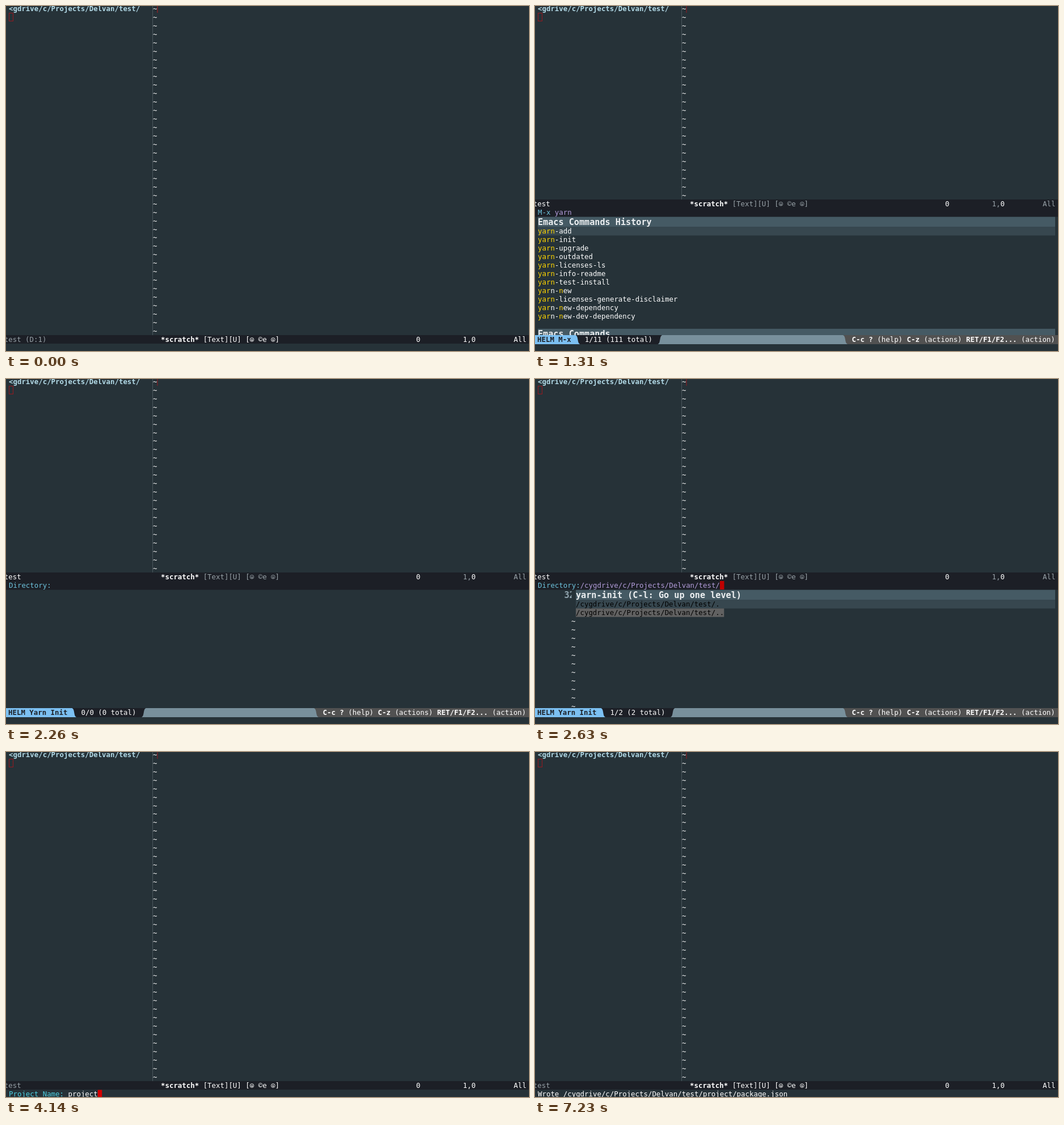
Animation, 922 px wide and 608 px high, one loop 8 s. Source, as an HTML page with a canvas:

```html
<!DOCTYPE html>
<html>
<head>
<meta charset="utf-8">
<style>
html, body { margin: 0; width: 100%; height: 100%; overflow: hidden; background: #263238; }
canvas { display: block; }
</style>
</head>
<body>
<canvas id="stage" width="922" height="608"></canvas>
<script>
const ctx = document.getElementById('stage').getContext('2d');
const LOOP = 8000, W = 922, H = 608;
const SIZE = 12.4, CHAR = SIZE * 0.60205, ROW = 14.95, BIG = 15.17, BIG_ROW = 17.8;
const BG = '#263238', DARK = '#1c1f26', WHITE = '#fff', GREY = '#98a2a8', YELLOW = '#ffd600';
const BAR = '#455a64', SELECTED = '#37474f', RED = '#d50000', DIM_RED = '#98191f';
const PATH = '/cygdrive/c/Projects/Delvan/test/';

const HISTORY = [
  'yarn-add', 'yarn-init', 'yarn-upgrade', 'yarn-outdated', 'yarn-licenses-ls',
  'yarn-info-readme', 'yarn-test-install', 'yarn-new',
  'yarn-licenses-generate-disclaimer', 'yarn-new-dependency', 'yarn-new-dev-dependency',
  'describe-key', 'neotree-dir', 'describe-variable', 'eval-buffer'
];
const COMMANDS = ['yarn-init', 'yarn-check-integrity', 'yarn-install', 'yarn-info'];

const rowTop = row => -2.9 + row * ROW;

function rect(x, y, w, h, color) {
  ctx.fillStyle = color;
  ctx.fillRect(x, y, w, h);
}

function text(x, top, str, color = WHITE, bold = false, size = SIZE) {
  ctx.font = `${bold ? 'bold ' : ''}${size}px "DejaVu Sans Mono", monospace`;
  ctx.fillStyle = color;
  ctx.fillText(str, x, Math.round(top + size * 0.945));
  return x + str.length * size * 0.60205;
}

// Each run is [string, color, bold].
const runs = (x, top, list) => list.reduce((at, run) => text(at, top, ...run), x);

function tildes(x, top, bottom) {
  for (let y = top; y < bottom; y += ROW) text(x, y, '~');
}

function clipped(x, y, w, h, draw) {
  ctx.save();
  ctx.beginPath();
  ctx.rect(x, y, w, h);
  ctx.clip();
  draw();
  ctx.restore();
}

function circled(x, top, letter, color) {
  ctx.strokeStyle = color;
  ctx.lineWidth = 0.9;
  ctx.beginPath();
  ctx.arc(x + CHAR / 2, top + 7.8, 3.3, 0, 7);
  ctx.stroke();
  ctx.font = 'bold 6px "DejaVu Sans Mono", monospace';
  ctx.fillStyle = color;
  ctx.fillText(letter, x + 2, top + 9.8);
}

function editor(bottomRow, helm, treeLabel, focused) {
  const top = rowTop(bottomRow);
  rect(0, 0, W, H, BG);
  text(5, rowTop(0), '<gdrive/c/Projects/Delvan/test/', '#b3dbe8', true);
  ctx.strokeStyle = DIM_RED;
  ctx.lineWidth = 1;
  ctx.strokeRect(5.5, 12.5, 7, 14);
  rect(258, 0, 1, top, '#4b565c');
  clipped(0, 0, W, top, () => tildes(259, rowTop(0), top));
  rect(266.5, 0, 1, 12, focused ? '#b51a1d' : DIM_RED);

  rect(0, Math.round(top), W, 15, DARK);
  const color = helm ? GREY : WHITE;
  text(-3.2, top, treeLabel, helm ? WHITE : GREY);
  runs(273, top, [['*scratch*', WHITE, true], [' [Text][U] [', color], ['  ©e  ]', color]]);
  circled(273 + 21 * CHAR, top, 'u', color);
  circled(273 + 26 * CHAR, top, 's', color);
  text(723, top, '0');
  runs(805.5, top, [['1,', color], ['0', WHITE]]);
  text(895, top, 'All', color);
}

// A band of the helm status line; its sides curve by the given widths.
function band(left, right, leftSlant, rightSlant, color) {
  const top = 580, bottom = 596;
  ctx.fillStyle = color;
  ctx.beginPath();
  ctx.moveTo(left, top);
  ctx.lineTo(right, top);
  ctx.bezierCurveTo(right + rightSlant * .7, top + 2, right + rightSlant * .3, bottom - 2, right + rightSlant, bottom);
  ctx.lineTo(left + leftSlant, bottom);
  ctx.bezierCurveTo(left + leftSlant * .3, bottom - 2, left + leftSlant * .7, top + 2, left, top);
  ctx.fill();
}

function helmStatus(name, count) {
  const top = rowTop(39), nameEnd = 4 + name.length * CHAR, countX = nameEnd + 24;
  const countEnd = countX + count.length * CHAR;
  rect(0, 580, W, 16, DARK);
  rect(500, 580, W - 500, 16, '#515151');
  band(countEnd + 17, 543, -7.5, 8, '#78909c');
  band(0, nameEnd + 8, 0, 7.5, '#7cc0f2');
  text(4, top, name, DARK, true);
  text(countX, top, count);
  runs(558.5, top, [
    ['C-c ?', WHITE, true], [' (help) '], ['C-z', WHITE, true], [' (actions) '],
    ['RET/F1/F2...', WHITE, true], [' (action)']
  ]);
}

function helmPrompt(label, input, cursor) {
  const top = rowTop(24);
  rect(0, Math.round(top), W, 15.5, DARK);
  const end = runs(5, top, [[label, '#6dc3dd'], [input, '#b39ddb']]);
  if (cursor) rect(end, top, CHAR, 15, '#c00000');
}

function header(x, top, title) {
  rect(x, top, 917 - x, BIG_ROW, BAR);
  text(x, top, title, '#eceff1', true, BIG);
}

// Fuzzy match preferring word starts and the last dash; returns matched indexes or null.
function match(name, pattern, from = 0) {
  if (!pattern) return [];
  const c = pattern[0];
  const wordStart = name.indexOf('-' + c, from);
  const options = [
    wordStart < 0 ? -1 : wordStart + 1,
    c === '-' ? name.lastIndexOf(c) : -1,
    name.indexOf(c, from)
  ];
  for (const i of options) {
    if (i < from) continue;
    const rest = match(name, pattern.slice(1), i + 1);
    if (rest) return [i, ...rest];
  }
  return null;
}

function commandList(pattern) {
  let y = rowTop(25) + 0.8;
  const section = (title, names) => {
    header(5, y, title);
    y += BIG_ROW;
    for (const name of names) {
      const hits = match(name, pattern);
      if (title.endsWith('History') && name === names[0]) rect(5, y, 912, ROW, SELECTED);
      runs(5, y, [...name].map((c, i) => [c, hits.includes(i) ? YELLOW : WHITE]));
      y += ROW;
    }
  };
  const found = names => names.filter(name => match(name, pattern));
  const recent = found(HISTORY);
  clipped(0, 371, W, 209, () => {
    section('Emacs Commands History', recent);
    y += ROW;
    section('Emacs Commands', found(COMMANDS));
    tildes(-3.2, y, 580);
  });
  return recent.length;
}

function commands(input, pattern, total, cursor) {
  editor(23, true, 'test');
  helmPrompt('M-x ', input, cursor);
  const count = commandList(pattern);
  helmStatus('HELM M-x', `1/${count} (${total} total)`);
}

function directory(input, rows, cursor = true, number = '32') {
  editor(23, true, 'test');
  helmPrompt('Directory:', input, cursor);
  const top = rowTop(25) + 0.8;
  if (rows) clipped(0, 371, W, 209, () => {
    clipped(0, 371, 64.5, 209, () => text(51.5, top, number, '#90a4ae', true, BIG));
    header(72, top, 'yarn-init (C-l: Go up one level)');
    rows.forEach((row, i) => {
      const y = top + BIG_ROW + i * ROW;
      rect(72, y, i ? row.length * CHAR : 845, ROW, i ? '#616161' : SELECTED);
      text(72, y, row, '#000');
    });
    tildes(64, top + BIG_ROW + rows.length * ROW, 580);
  });
  const n = rows ? rows.length : 0;
  helmStatus('HELM Yarn Init', `${n && 1}/${n} (${n} total)`);
}

function echo(label, input, cursor) {
  editor(39, false, 'test');
  const end = runs(5, rowTop(40), [[label, '#4dd0e1'], [input, WHITE]]);
  if (cursor) rect(end, 595.5, CHAR, 13, RED);
}

function typeDirectory(t) {
  const name = 'project'.slice(0, 1 + Math.floor((t - 3190) / 75));
  directory(PATH + name, [PATH + name]);
}

const SCENES = [
  [0, () => editor(39, false, 'test (D:1)', true)],
  [680, () => commands('', '', 4187, true)],
  [930, () => commands('y', '', 4187, true)],
  [980, () => commands('y', 'y', 1206, false)],
  [1060, () => commands('ya', 'y', 1206, true)],
  [1120, () => commands('yar', 'y', 1206, true)],
  [1180, () => commands('yar', 'yar', 214, false)],
  [1250, () => commands('yarn', 'yar', 214, true)],
  [1310, () => commands('yarn', 'yarn', 111, false)],
  [1360, () => commands('yarn-', 'yarn', 111, true)],
  [1430, () => commands('yarn-', 'yarn-', 63, false)],
  [1500, () => commands('yarn-i', 'yarn-', 63, true)],
  [1560, () => commands('yarn-in', 'yarn-', 63, true)],
  [1680, () => commands('yarn-in', 'yarn-in', 8, false)],
  [1750, () => commands('yarn-ini', 'yarn-in', 8, true)],
  [1810, () => commands('yarn-init', 'yarn-in', 8, true)],
  [1870, () => commands('yarn-init', 'yarn-init', 3, false)],
  [2060, () => commands('yarn-init', 'yarn-init', 3, true)],
  [2170, () => directory('', null, false)],
  [2270, () => directory(PATH, null, false)],
  [2380, () => directory(PATH, null)],
  [2630, () => directory(PATH, [PATH + '.', PATH + '..'])],
  [3190, typeDirectory],
  [3820, () => directory(PATH + 'project', [''], false, '')],
  [3890, () => directory(PATH + 'project', [PATH + 'project'])],
  [4070, () => echo('', '')],
  [4140, () => echo('Project Name: ', 'project', true)],
  [5310, () => echo('Description: ', 'project', true)],
  [6120, () => echo('Keywords (http, parsing, etc): ', 'project, project', true)],
  [7050, () => echo('', '')],
  [7140, () => echo('', `Wrote ${PATH}project/package.json`)]
];

const start = performance.now();
function frame() {
  const t = (performance.now() - start) % LOOP;
  SCENES.findLast(([from]) => from <= t)[1](t);
  requestAnimationFrame(frame);
}
frame();
</script>
</body>
</html>
```
